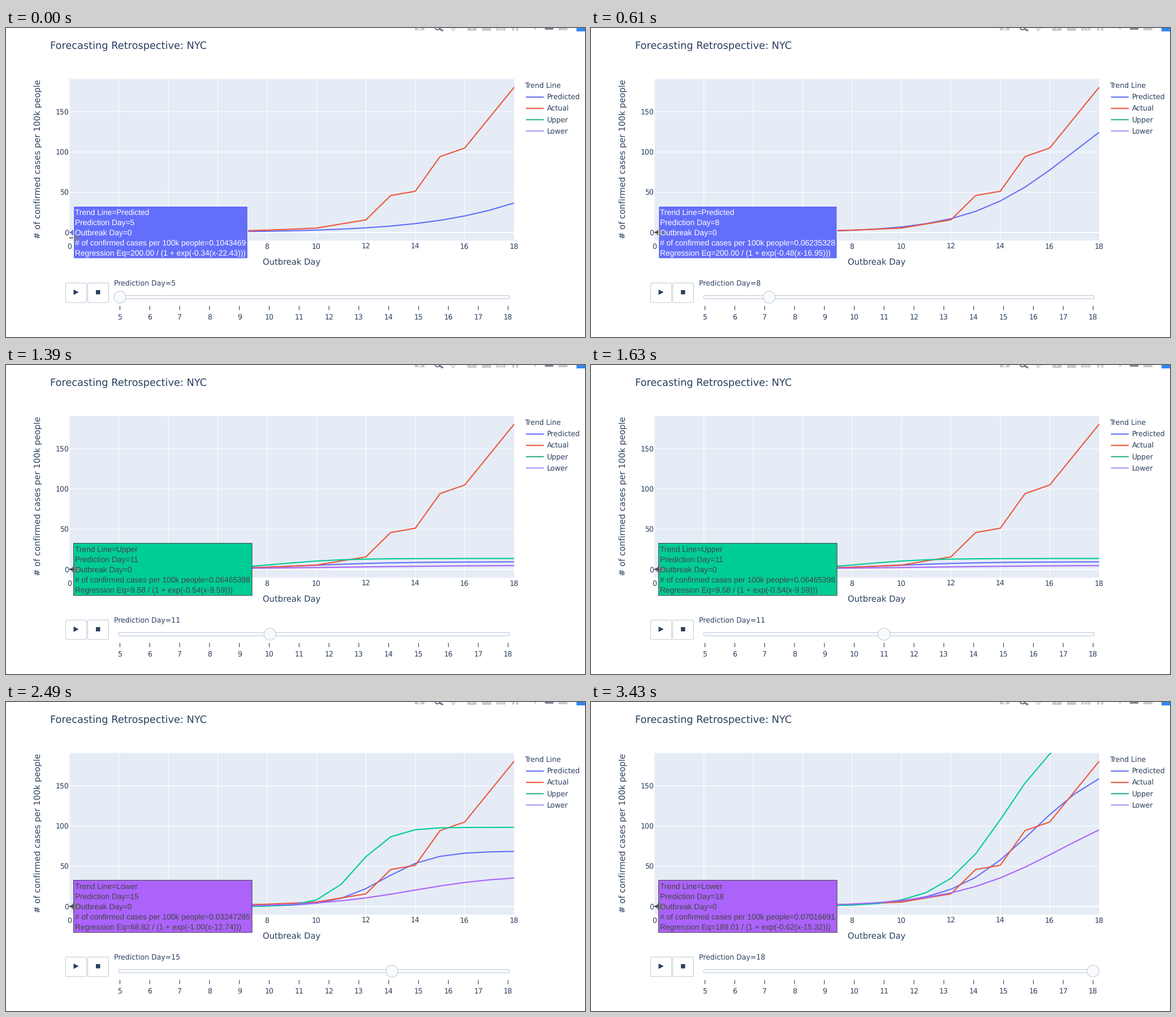
A matplotlib script that plays this animation: 1024x547 px, repeating every 3.58 s.

```python
import numpy as np
import matplotlib.pyplot as plt
from matplotlib.animation import FuncAnimation
from matplotlib.patches import Circle, FancyBboxPatch, Polygon, Rectangle

W, H, DPI = 1024, 547, 64
LOOP, STEP = 3580, 20
TICK = LOOP / 46  # the picture only changes on these beats
PT = 72 / DPI     # points per pixel

INK, PALE, EDGE, ICON = "#2a3f5f", "#f8fafc", "#bec8d9", "#c9c9c9"
NAMES = ["Predicted", "Actual", "Upper", "Lower"]
COLORS = ["#636efa", "#ef553b", "#00cc96", "#ab63fa"]
KEY_COLORS = COLORS[:2] + ["#2ab08c", "#a893f5"]
INVERSE = ["#9c9105", "#10aac4", "#ff3369", "#549c05"]

DAYS = np.arange(19)
FIRST, LAST = 5, 18
CAP = 200  # limit of a fit that has not found its plateau yet

# prediction day, logistic limit, rate, midpoint, hovered value
FIT_KEYS = np.array([
    (5, CAP, .337, 22.43, .1043469),
    (6, CAP, .440, 18.00, .1855503),
    (7, CAP, .450, 17.69, .07028134),
    (9, CAP, .506, 16.22, .05442523),
    (11, 9.58, .540, 9.59, .06465398),
    (12, CAP, .490, 17.04, .05316287),
    (13, CAP, .471, 17.24, .05903815),
    (15, 68.82, 1.00, 12.74, .03247285),
    (18, 189.01, .620, 15.32, .07016691),
])

# each day begins on the beat its steady pace falls in
STARTS = {d: np.interp(d, [5, 6, 13, 18], [0, 1, 26, 42])
          for d in range(FIRST, LAST + 1)}
HOVER_STARTS = {**STARTS, 7: STARTS[7] + 1}  # the resting label lingers a beat


def day_at(beat, starts):
    return max(d for d, s in starts.items() if int(s) <= beat)


def fit_for(day):
    return [np.interp(day, FIT_KEYS[:, 0], col) for col in FIT_KEYS.T[1:]]


def logistic(limit, rate, mid):
    return limit / (1 + np.exp(-rate * (DAYS - mid)))


def band(limit, rate, mid, day, side):
    """Upper (side=1) or lower (side=-1) edge around a fit."""
    spread = side * np.interp(day, [15, 18], [.43, .25])
    return logistic(limit * (1 + spread), rate * (1 + 1.08 * spread),
                    mid - 1.1 * side)


def actual():
    early = .1855503 * np.exp(.345 * DAYS)
    late = np.interp(DAYS, [10, 12, 13, 14, 15, 16, 18],
                     [5.5, 15.7, 45.9, 51.3, 94.3, 105, 180.5])
    return np.where(DAYS < 10, early, late)


def hovered(day, bounded):
    if day == 6:
        return 1
    if not bounded:
        return 0
    return 2 if day < 13 else 3


def px(day):
    return 112.4 + 43.68 * np.asarray(day)


def py(value):
    return 362 - 1.4245 * np.asarray(value)


def knob_x(day):
    return 201.5 + 52.81 * (day - FIRST)


plt.rcParams.update({"font.family": "DejaVu Sans", "path.snap": False,
                     "text.hinting": "none"})
fig = plt.figure(figsize=(W / DPI, H / DPI), dpi=DPI, facecolor="white")
ax = fig.add_axes([0, 0, 1, 1])
ax.set_xlim(0, W)
ax.set_ylim(H, 0)
ax.axis("off")


def text(x, y, s, size=12.5, color=INK, **kw):
    kw = {"ha": "left", "va": "baseline", **kw}
    return ax.text(x, y, s, fontsize=size * PT, color=color, **kw)


def line(xs, ys, color, width=1, **kw):
    kw = {"solid_capstyle": "butt", **kw}
    return ax.plot(xs, ys, color=color, lw=width * PT, **kw)[0]


def box(x0, y0, x1, y1, fill, edge="none", **kw):
    return ax.add_patch(Rectangle((x0, y0), x1 - x0, y1 - y0, fc=fill,
                                  ec=edge, lw=PT, **kw))


def round_box(x0, y0, x1, y1, r, fill):
    ax.add_patch(FancyBboxPatch((x0, y0), x1 - x0, y1 - y0, fc=fill, ec=EDGE,
                                boxstyle=f"round,pad=0,rounding_size={r}",
                                lw=PT))


def draw_toolbar():
    box(723, 0, 740, 4, ICON)
    ax.add_patch(Circle((731.5, 0), 3, fc="white", ec="none"))
    ax.add_patch(Circle((763, -1), 4.2, fc="none", ec="#6b7488", lw=2 * PT))
    line([766, 773], [1, 5], "#6b7488", 3)
    line([785, 797], [0, 0], ICON, 2)
    ax.add_patch(Polygon([(787.5, 2), (794.5, 2), (791, 6)], fc=ICON))
    for x in (816, 842):
        box(x, 0, x + 16, 5, ICON)
    line([824, 824], [0, 2], "white", 2)
    for x in (867, 879, 895, 902):
        box(x, 0, x + 4, 4.5, ICON)
    line([872, 878], [1, 4], ICON, 2)
    line([878, 872], [1, 4], ICON, 2)
    box(934.5, 0, 937, 3, ICON)
    box(953, 0, 968, 3, "#7d8596")
    box(977, 0, 993, 4, ICON)
    box(1009, 0, 1024, 6, "#2f88f6")


def draw_chart():
    text(78, 37.5, "Forecasting Retrospective: NYC", 17.8)
    area = box(px(0), 90.3, px(18), 376.3, "#e5ecf6", zorder=0)
    for d in range(2, 18, 2):
        line([px(d)] * 2, [90.3, 376.3], "white", 1.1, zorder=1)
    for v in range(0, 151, 50):
        line([px(0), px(18)], [py(v)] * 2, "white", 1.1 if v else 2.1, zorder=1)
        text(111, py(v) + 4.5, v, ha="right")
    for d in range(0, 19, 2):
        text(px(d) - .3, 390.5, d, ha="center")
    text(505.5, 418.5, "Outbreak Day", 14.7, ha="center")
    text(61, 232.5, "# of confirmed cases per 100k people", 14.7,
         ha="center", rotation=90, rotation_mode="anchor")
    return area


def draw_legend():
    text(917, 107, "Trend Line")
    for i, name in enumerate(NAMES):
        y = 122.3 + 20 * i
        line([919.5, 951], [y, y], KEY_COLORS[i], 2.1)
        text(956.5, y + 4.7, name)


def draw_controls():
    for x in (105.5, 144.5):
        round_box(x, 451.5, x + 37, 486, 2, "white")
    ax.add_patch(Polygon([(119.5, 463), (128.5, 467.7), (119.5, 472.5)],
                         fc=INK, ec="none"))
    box(159, 464, 166.5, 471.5, INK)
    round_box(199, 473.5, 890.5, 479.5, 2.9, PALE)
    for d in STARTS:
        line([knob_x(d)] * 2, [492, 499.5], "#333f50", 1.1)
        text(knob_x(d), 515.5, d, ha="center")


draw_toolbar()
area = draw_chart()
draw_legend()
draw_controls()

curves = [line([], [], c, 2.1, zorder=3, solid_joinstyle="round") for c in COLORS]
for c in curves:
    c.set_clip_path(area)
curves[1].set_data(px(DAYS), py(actual()))

knob = ax.add_patch(Circle((knob_x(FIRST), 476.5), 10.6, fc=PALE, ec=EDGE,
                           lw=PT, zorder=4))
day_label = text(191, 456, "")

arrow = ax.add_patch(Polygon([(113, 362), (120, 355.5), (120, 368.5)],
                             ec="none", zorder=5))
hover = box(119.5, 315.5, 427.5, 408, COLORS[0], "white", zorder=5)
hover_lines = [text(122.5, 331.3 + 17.9 * i, "", 13.75, zorder=6,
                    family="Liberation Sans") for i in range(5)]

cursor = [line([112, 119], [0, 0], "black", zorder=7),
          line([120, 131], [0, 0], "black", zorder=7),
          line([121.5, 121.5], [0, 0], "black", zorder=7)]


def show_curves(day):
    *fit, _ = fit_for(day)
    curves[0].set_data(px(DAYS), py(logistic(*fit)))
    for curve, side in ((curves[2], 1), (curves[3], -1)):
        curve.set_data(px(DAYS), py(band(*fit, day, side)))
        curve.set_visible(fit[0] < CAP)
    day_label.set_text(f"Prediction Day={day}")


def show_hover(day):
    limit, rate, mid, value = fit_for(day)
    trace = hovered(day, limit < CAP)
    ink = "#444444" if trace else "white"
    number = f"{value:.7g}"
    rows = [f"Trend Line={NAMES[trace]}",
            f"Prediction Day={day}",
            "Outbreak Day=0",
            f"# of confirmed cases per 100k people={number}",
            f"Regression Eq={limit:.2f} / (1 + exp(-{rate:.2f}(x-{mid:.2f})))"]
    for label, row in zip(hover_lines, rows):
        label.set_text(row)
        label.set_color(ink)
    hover.set_width(308 + 7.6 * (len(number) - 9))
    hover.set_facecolor(COLORS[trace])
    hover.set_edgecolor(ink)
    arrow.set_facecolor(COLORS[0] if day == FIRST else "#72758a")
    for part in cursor[1:]:
        part.set_color(INVERSE[trace])


def show_cursor(y):
    cursor[0].set_ydata([y, y])
    cursor[1].set_ydata([y, y])
    cursor[2].set_ydata([y - 9, y + 9])


def show_knob(beat, day):
    # it sets off within the day's first beat and lands on the next
    since = beat + 1 - STARTS[day]
    part = .18 * since if since <= 1 and day > FIRST else 1
    knob.center = (knob_x(day - 1 + part), 476.5)


def update(frame):
    beat = int((frame + .5) * STEP / TICK + .2)
    day = day_at(beat, STARTS)
    show_curves(day)
    show_hover(day_at(beat, HOVER_STARTS))
    show_cursor(371.5 if day == FIRST else 361.5)
    show_knob(beat, day)
    return []


anim = FuncAnimation(fig, update, frames=LOOP // STEP, interval=STEP,
                     repeat=True, repeat_delay=0, blit=False)
plt.show()
```
